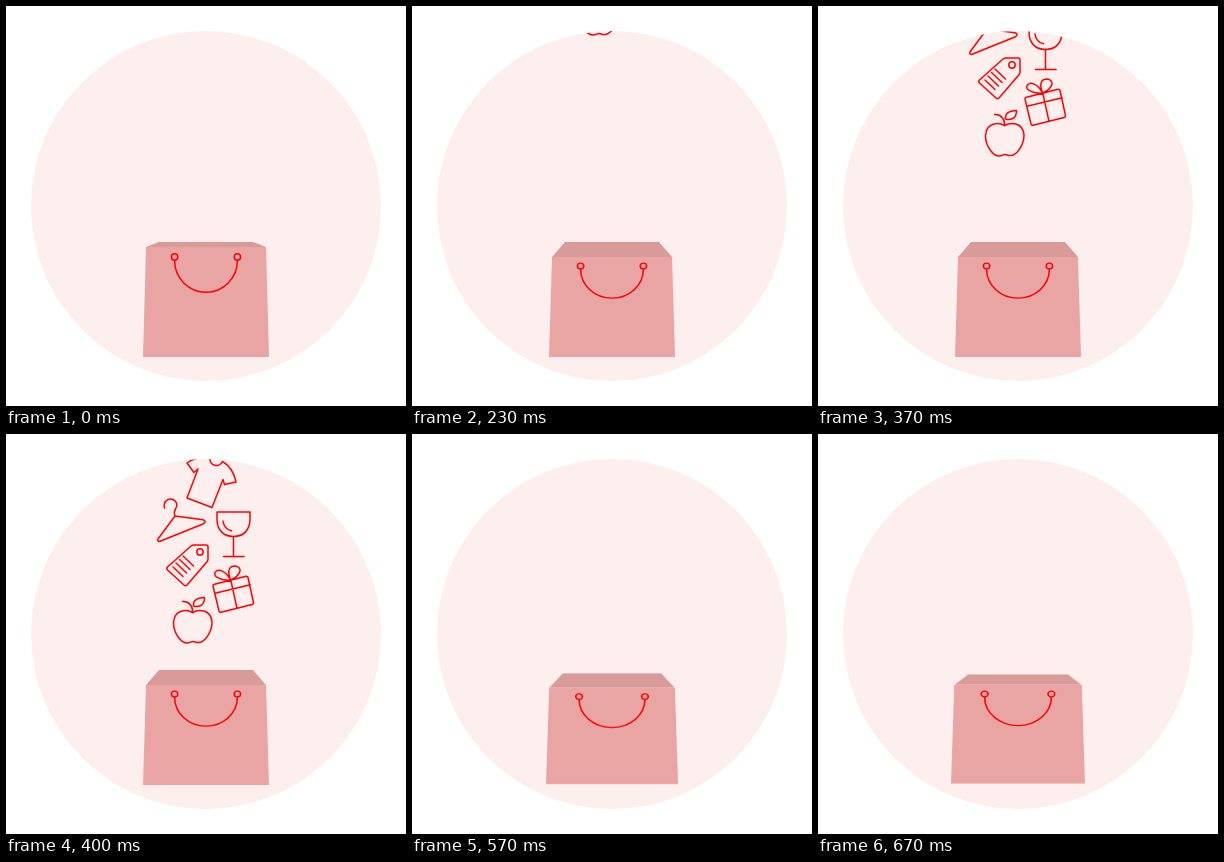
An HTML page that plays this animation: 400x400 px, repeating every 710 ms.

```html
<!DOCTYPE html>
<html lang="en">
<head>
<meta charset="utf-8">
<title>Shopping bag</title>
<style>
  html, body { margin: 0; width: 100%; height: 100%; overflow: hidden; background: #fff; }
  svg { display: block; width: 400px; height: 400px; }

  .line { fill: none; stroke: #f00; stroke-width: 1.5; stroke-linejoin: round; stroke-linecap: round; }

  .bag, .back, .front, .items { animation: 710ms step-end infinite; }
  .bag   { transform-origin: 200px 326px; animation-name: squash; }
  .back  { transform-origin: 200px 236px; animation-name: unfold; }
  .front { transform-origin: 200px 351px; animation-name: lower; }
  .items { animation-name: fall; }

  @keyframes squash {
    0%     { transform: none; }
    74.64% { transform: scale(1.01, .992); }
    80.28% { transform: scale(1.048, .962); }
    84.5%  { transform: scale(1.088, .93); }
    88.73% { transform: scale(1.1, .92); }
    94.36% { transform: scale(1.063, .95); }
    100%   { transform: none; }
  }
  @keyframes unfold {
    0%     { transform: scaleY(.3333); }
    4.22%  { transform: scaleY(.5333); }
    9.85%  { transform: scaleY(.8); }
    14.08% { transform: none; }
    94.36% { transform: scaleY(.7333); }
    100%   { transform: scaleY(.3333); }
  }
  @keyframes lower {
    0%     { transform: none; }
    4.22%  { transform: scaleY(.9727); }
    9.85%  { transform: scaleY(.9364); }
    14.08% { transform: scaleY(.9091); }
    94.36% { transform: scaleY(.9455); }
    100%   { transform: none; }
  }
  @keyframes fall {
    0%     { transform: translateY(-220px); }
    32.39% { transform: translateY(-180px); }
    38.02% { transform: translateY(-163.5px); }
    42.25% { transform: translateY(-138.5px); }
    46.47% { transform: translateY(-104.5px); }
    52.11% { transform: translateY(-59px); }
    56.33% { transform: none; }
    60.56% { transform: translateY(73px); }
    66.19% { transform: translateY(160.5px); }
    70.42%, 100% { transform: translateY(270px); }
  }
</style>
</head>
<body>
<svg viewBox="0 0 400 400">
  <clipPath id="drop"><path d="M25 200A175 175 0 0 1 375 200V300H25Z"/></clipPath>

  <circle cx="200" cy="200" r="175" fill="#fdefee"/>

  <g class="bag">
    <path class="back" fill="#d99a9a" d="M153 236H247L260 251H140Z"/>
    <g clip-path="url(#drop)">
      <g class="items line">
        <!-- shirt -->
        <path d="M181 29Q191 22 204 23C203 32.5 213 34 216.5 27.5Q227 33.5 230 48L218.5 50.5 217 45.5 206 73.5 181 64 192 35 188 38.5Z"/>
        <!-- hanger -->
        <path d="M158.6 74C157 68.5 160.5 65 164.5 65C168.5 65 171 68.3 170.8 71.5C170.5 75.5 166.5 76.5 169 82L197 85.8Q201 87 197.5 89.7L153.5 107.5Q150.5 107 152.5 104.3L169 82"/>
        <!-- glass -->
        <path d="M211 78H244V85C244 96 237.5 102.5 227.5 102.5S211 96 211 85ZM227.5 102.5V122.5M217.5 122.5H238M217 87Q218 95 225.5 96.8"/>
        <!-- tag -->
        <path d="M188 111H200Q202 111 202 113V125Q202 126.5 201 127.7L181 151Q179.5 152.5 178 151L161.5 136Q160 134.5 161.5 133L185 112Q186.3 111 188 111ZM167 133l10 9.5M170 129l10.5 10M173.5 125.5l10.5 10M177 122l10.5 10"/>
        <circle cx="194" cy="118" r="3.2"/>
        <!-- gift -->
        <path d="M208.5 150.2L240 142.3Q241.5 142 242 143.5L247.5 168.5Q247.7 170 246.2 170.5L215 178.3Q213.5 178.5 213 177L207 152Q206.8 150.6 208.5 150.2ZM209 159.3L244.3 150.8M224.8 146.2L231 174.3M224.5 146C214 147 207 142 209 138.5C212 134 220 137 224.5 146C221 137 223 132 229 132C237 133 235.5 141 224.5 146"/>
        <!-- apple -->
        <path d="M186.7 178.7C181 175 168 175 167.5 189C167.5 199 175 209 181 209C184 209 185 207.5 187 207.5C189 207.5 190 209 193 208.5C199 208 206 198 206 188C205 175 192 175 186.7 178.7C187 172 183 167 176.5 167.5M187.5 172C187 166 191 164 198.5 163.5C198.5 170 195 174 187.5 172"/>
      </g>
    </g>
    <g class="front">
      <path fill="#e8a5a4" d="M140 241H260L263 351H137Z"/>
      <g class="line">
        <circle cx="168.6" cy="251" r="3.2"/>
        <circle cx="231.4" cy="251" r="3.2"/>
        <path d="M168.6 254.5A31.4 31.8 0 0 0 231.4 254.5"/>
      </g>
    </g>
  </g>
</svg>
</body>
</html>
```
